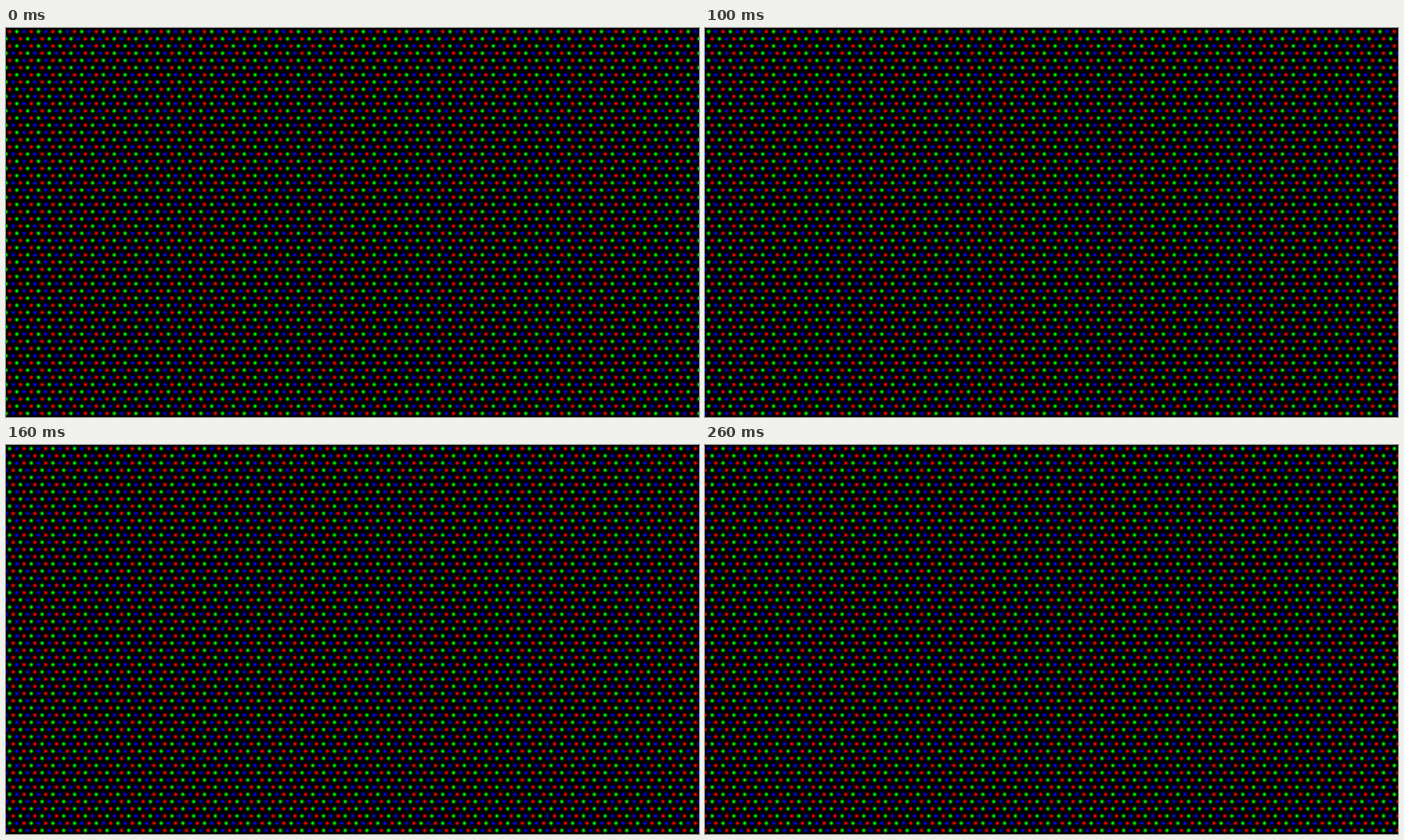
An HTML page with a canvas that plays this animation: 998 px wide and 561 px high, repeating every 0.3 s.

```html
<!DOCTYPE html>
<html lang="en">
<head>
<meta charset="utf-8">
<title>RGB dot mask</title>
<style>
  html, body { margin: 0; width: 100%; height: 100%; overflow: hidden; background: #000; }
  canvas { display: block; }
</style>
</head>
<body>
<canvas id="stage" width="998" height="561"></canvas>
<script>
const STEP_MS = 100, STEPS = 3;
const COLS = 96, ROWS = 54, RADIUS = 4.4;
const canvas = document.getElementById('stage');
const ctx = canvas.getContext('2d');
const pitchX = canvas.width / COLS, pitchY = canvas.height / ROWS;

function glow(rgb) {
  const gradient = ctx.createRadialGradient(0, 0, 0, 0, 0, RADIUS);
  [[0, 1], [0.25, 0.92], [0.5, 0.5], [0.75, 0.13], [1, 0]]
    .forEach(([stop, alpha]) => gradient.addColorStop(stop, `rgba(${rgb},${alpha})`));
  return gradient;
}

const glows = ['255,0,0', '0,255,0', '0,0,255'].map(glow);

// Odd rows sit half a dot to the left and one and a half dots along the colour cycle.
function drawMask(step) {
  ctx.setTransform(1, 0, 0, 1, 0, 0);
  ctx.fillStyle = '#000';
  ctx.fillRect(0, 0, canvas.width, canvas.height);
  for (let row = 0; row < ROWS; row++) {
    const odd = row % 2;
    for (let col = 0; col <= COLS; col++) {
      const x = (col + (odd ? 0 : 0.5)) * pitchX;
      const y = (row + 0.5) * pitchY;
      ctx.setTransform(1, 0, 0, 1, x, y);
      ctx.fillStyle = glows[(col + odd + step) % 3];
      ctx.fillRect(-RADIUS, -RADIUS, RADIUS * 2, RADIUS * 2);
    }
  }
}

let shown = -1;
const start = performance.now();

function tick() {
  const step = Math.floor((performance.now() - start) / STEP_MS) % STEPS;
  if (step !== shown) drawMask(shown = step);
  requestAnimationFrame(tick);
}
tick();
</script>
</body>
</html>
```
